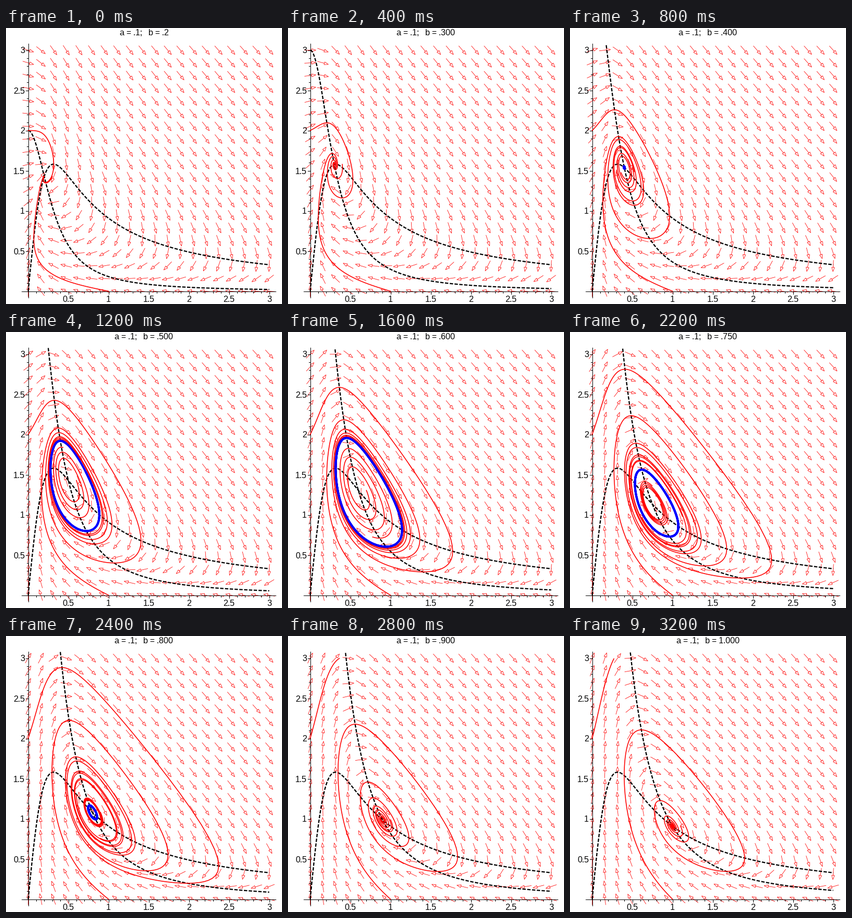
Animation, 529 px wide and 529 px high, one loop 3300 ms. Source, as a matplotlib script:

```python
import numpy as np
import matplotlib.pyplot as plt
from matplotlib.animation import FuncAnimation
from matplotlib.collections import LineCollection

plt.rcParams.update({
    "font.family": "Liberation Sans", "font.size": 16,
    "text.hinting": "native", "text.hinting_factor": 1,
    "path.simplify": False,
})

SIZE, FRAMES = 529, 33
A, UNIT, X0, Y0 = 0.1, 154, 42.5, 504.5
DT, T_RED, T_BLUE, T_END = 0.05, 30, 190, 210
RED, BLUE = "#ff0000", "#0000ff"
B = 0.2 + 0.025 * np.arange(FRAMES)


def px(x):
    return X0 + UNIT * np.asarray(x)


def py(y):
    return Y0 - UNIT * np.asarray(y)


def flow(x, y, b):
    """Glycolysis oscillator."""
    r = (A + x * x) * y
    return np.stack([r - x, b - r])


def solve():
    """RK4 for every b at once; result is (step, xy, start, b)."""
    x = np.stack([0 * B, 0 * B + 1, B + 0.1])
    y = np.stack([0 * B + 2, 0 * B, B / (A + B * B)])
    s = np.stack([x, y])
    path = [s]
    for _ in range(int(T_END / DT)):
        k1 = flow(*s, B)
        k2 = flow(*(s + DT / 2 * k1), B)
        k3 = flow(*(s + DT / 2 * k2), B)
        k4 = flow(*(s + DT * k3), B)
        s = s + DT / 6 * (k1 + 2 * k2 + 2 * k3 + k4)
        path.append(s)
    return np.array(path)


def arrows(b, length=22, head=8, half=2.7):
    gx, gy = np.meshgrid(np.linspace(0, 3, 20), np.linspace(0, 3, 20))
    u, v = flow(gx, gy, b)
    d = np.stack([u, -v], -1) / np.hypot(u, v)[..., None]
    n = np.stack([-d[..., 1], d[..., 0]], -1)
    mid = np.stack([px(gx), py(gy)], -1)
    tip, tail = mid + d * length / 2, mid - d * length / 2
    base = tip - d * head
    pts = [tail, base, base + n * half, tip, base - n * half, base]
    return np.stack(pts, -2).reshape(-1, 6, 2)


def until_exit(x, y):
    """Cut a path where it first leaves the plotted square."""
    out = np.flatnonzero((y > 3) | (x > 3))
    end = out[0] if out.size else len(x)
    return px(x[:end]), py(y[:end])


fig = plt.figure(figsize=(SIZE / 72, SIZE / 72), dpi=72, facecolor="white")
ax = fig.add_axes([0, 0, 1, 1])
ax.set_xlim(0, SIZE)
ax.set_ylim(SIZE, 0)
ax.axis("off")


def line(color, width, x=(), y=(), **kw):
    return ax.plot(x, y, color=color, lw=width, **kw)[0]


def draw_axes():
    line("black", 1, [30, 517], [Y0, Y0])
    line("black", 1, [X0, X0], [30, 517])
    for i in range(1, 31):
        size = 5 if i % 5 == 0 else 3
        p, q = px(i / 10), py(i / 10)
        line("black", 1, [p, p], [Y0, Y0 + size])
        line("black", 1, [X0 - size, X0], [q, q])
        if i % 5 == 0:
            label = f"{i / 10:g}"
            ax.text(p, 525, label, ha="center", va="baseline")
            ax.text(36, q + 6, label, ha="right", va="baseline")


draw_axes()
title = ax.text(264.5, 14, "", ha="center", va="baseline")
field = LineCollection([], colors=RED, linewidths=0.8, joinstyle="miter", zorder=1)
ax.add_collection(field)
dashed = dict(linestyle=(0, (2.8, 1.2)), dash_capstyle="butt", zorder=3)
x_null = line("black", 2.3, **dashed)
y_null = line("black", 2.3, **dashed)
reds = [line(RED, 1.6, zorder=4) for _ in range(3)]
cycle = line(BLUE, 4, zorder=5, solid_capstyle="round", solid_joinstyle="round")

paths = solve()
xs = np.linspace(0, 3, 601)
x_null.set_data(px(xs), py(xs / (A + xs * xs)))


def update(i):
    b = B[i]
    value = ".2" if i == 0 else f"{b:.3f}".removeprefix("0")
    title.set_text(f"a = .1;   b = {value}")
    field.set_segments(arrows(b))

    ys = b / (A + xs * xs)
    shown = ys <= 3.08
    y_null.set_data(px(xs[shown]), py(ys[shown]))

    for k, red in enumerate(reds):
        x, y = paths[:int(T_RED / DT), :, k, i].T
        red.set_data(*until_exit(x, y))

    # the settled orbit, hidden once it has shrunk to a point
    x, y = paths[int(T_BLUE / DT):, :, 1, i].T
    cycle.set_data(px(x), py(y))
    cycle.set_visible(bool(np.ptp(px(x)) > 0.5))
    return [title, field, y_null, *reds, cycle]


anim = FuncAnimation(fig, update, frames=FRAMES, interval=100,
                     repeat=True, repeat_delay=0, blit=False)
plt.show()
```
